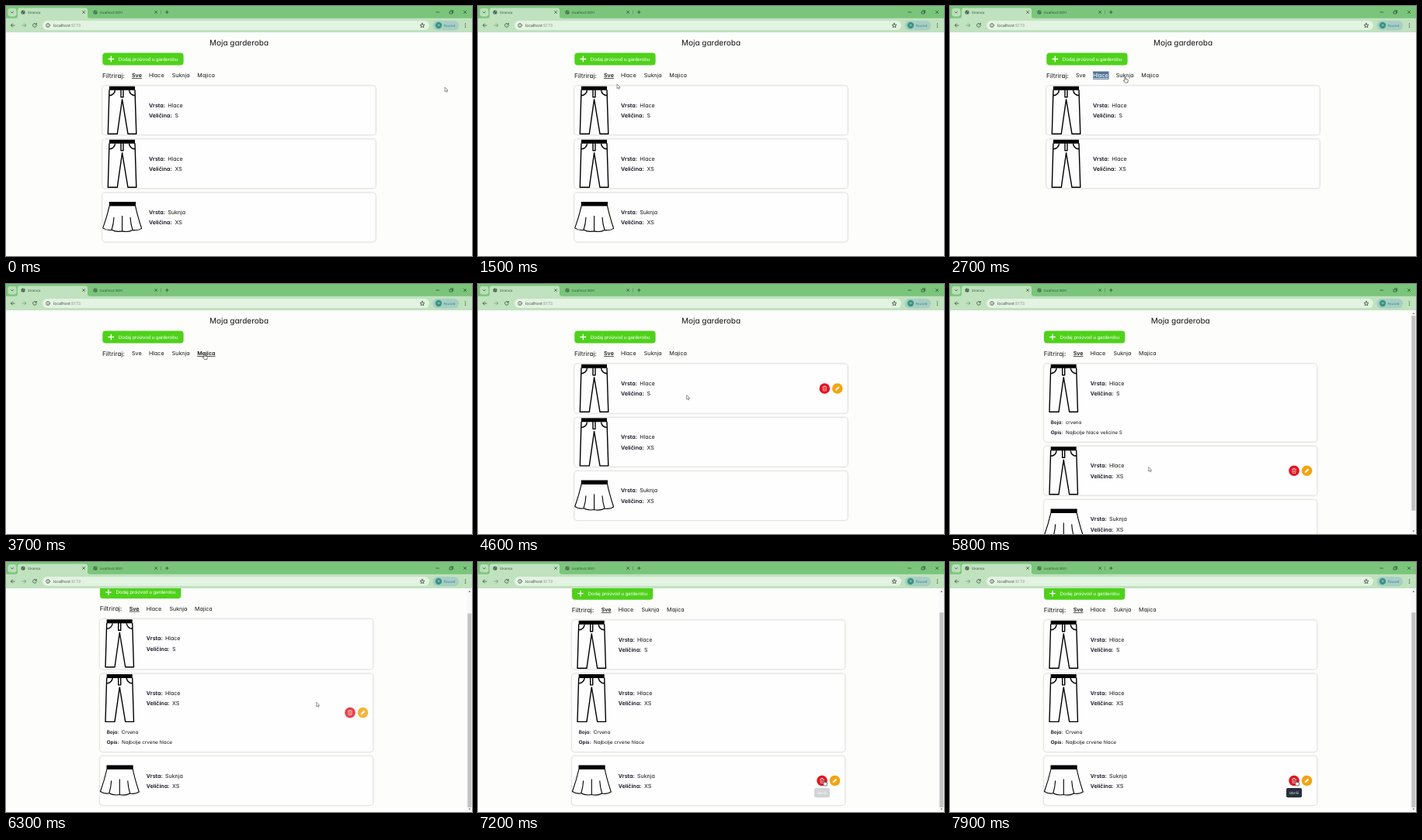
Write an HTML page that moves like this. It is 600x323 px and loops after 8 s.

```html
<!DOCTYPE html>
<html lang="hr">
<head>
<meta charset="utf-8">
<title>Moja garderoba</title>
<style>
  html, body { margin: 0; width: 100%; height: 100%; overflow: hidden; background: #fdfefc; }
  svg { display: block; width: 600px; height: 323px; }
  text { text-rendering: geometricPrecision; white-space: pre; }
  .page text { font-family: Inter, sans-serif; font-size: 7.1px; font-feature-settings: "cv11"; fill: #111; }
  .page .title { font-size: 10px; text-anchor: middle; }
  .page .label { font-size: 8.1px; }
  .page .small text { font-size: 6.3px; }
  .page .add { font: 6.2px "Liberation Sans", Arial, sans-serif; fill: #fff; }
  .page .tip { font: 4.6px "Open Sans", sans-serif; fill: #fff; text-anchor: middle; }
  .page .b { font-weight: 600; fill: #0c0c1c; }
  .page .on { font-weight: 600; text-decoration: underline; text-decoration-thickness: .8px; }
  .page .sel { fill: #fff; font-weight: 500; }
  .chrome text { font: 4.4px "Open Sans", sans-serif; fill: #2b4a2e; }
  .chrome .url { font-size: 5.2px; }
  .line { fill: none; stroke: #2b4a2e; stroke-width: .75; stroke-linecap: round; stroke-linejoin: round; }
  .ink { fill: none; stroke: #000; stroke-width: 1.4; stroke-linejoin: round; }
  .panel { fill: #fefefe; filter: drop-shadow(0 .9px .8px rgba(0,0,0,.3)); }
</style>
</head>
<body>
<svg viewBox="0 0 600 323">
  <defs>
    <clipPath id="view"><rect y="34" width="600" height="289"/></clipPath>
    <g id="pants">
      <path d="M9 .5H42V5.5H9Z"/>
      <path class="ink" d="M9 5L7.3 62H19.3L25.6 17.5L33 62H43.8L42 5M24 5V14.5H27V5M9 12.5Q15.5 12 16.5 5.5M42 12.5Q35.5 12 34.5 5.5"/>
    </g>
    <g id="skirt" transform="translate(0 -.5)">
      <path d="M8.8 12H43V17.5H8.8Z"/>
      <path class="ink" style="stroke-width:1.1" d="M9.3 17C7 27 4 37 .8 46Q6 49.5 12 48.3Q18 51.5 25.5 50Q33 51.8 39 48.5Q46 49.8 50.6 46.5C47.5 37 44.5 27 42.5 17M15 32Q14.5 41 12 48.3M25.6 30V50M36 32Q36.5 41 39 48.5"/>
    </g>
    <g id="globe">
      <circle r="2.6" fill="#3f6045"/>
      <path d="M-1.8 -.6Q-.6 .2 -.4 1.7M.2 -1.8Q.2 -.4 1.8 .1" stroke="#b5dfb4" stroke-width=".7" fill="none"/>
    </g>
  </defs>

  <rect width="600" height="323" fill="#fdfefc"/>
  <g class="page" clip-path="url(#view)">
    <g id="doc">
      <text class="title" x="300" y="51.3">Moja garderoba</text>
      <rect x="124.3" y="60.4" width="104.3" height="16.2" rx="4" fill="#4fd11b"/>
      <path d="M132 68.5H138.6M135.3 65.2V71.8" stroke="#fff" stroke-width="1.3" stroke-linecap="round"/>
      <text class="add" x="144.8" y="70.7">Dodaj proizvod u garderobu</text>
      <text class="label" x="124" y="92.8">Filtriraj:</text>
      <rect id="mark" x="184" y="84.5" width="20.5" height="10.3" fill="#4f7399"/>
      <g id="filters"></g>
      <g id="cards"></g>
    </g>
    <g id="bar">
      <rect x="593.5" y="34" width="6.5" height="289" fill="#f7f8f7"/>
      <path d="M595.3 39L596.8 37L598.3 39ZM595.3 318.6L596.8 320.6L598.3 318.6Z" fill="#777"/>
      <rect id="thumb" x="594.3" width="5" fill="#c1c2c1"/>
    </g>
  </g>

  <g class="chrome">
    <rect width="600" height="17" fill="#7ac57b"/>
    <rect y="15.8" width="600" height="18.2" fill="#c0e2bf"/>
    <rect x="2.5" y="3" width="11" height="10.5" rx="3" fill="#b9dfb8"/>
    <path class="line" d="M6.5 7.5L8 9L9.5 7.5"/>
    <path d="M12 16Q15 16 15 13V5.5Q15 2.5 18 2.5H102Q105 2.5 105 5.5V13Q105 16 108 16Z" fill="#c0e2bf"/>
    <use href="#globe" x="22" y="8"/>
    <use href="#globe" x="115" y="8"/>
    <text x="28" y="9.5">Stranica</text>
    <text x="121" y="9.5">localhost:3001</text>
    <path class="line" d="M98.6 6.5L101.6 9.5M101.6 6.5L98.6 9.5M191.6 6.5L194.6 9.5M194.6 6.5L191.6 9.5M205.3 8H209.3M207.3 6V10"/>
    <path class="line" opacity=".4" d="M199.5 5.8V10.2"/>
    <path class="line" d="M553.8 8H557.6M571.5 7H574.5V10H571.5ZM572.7 5.8H575.7V8.8M589.3 6.3L592.7 9.7M592.7 6.3L589.3 9.7"/>
    <path class="line" d="M11 25H6.5M8.5 22.8L6.3 25L8.5 27.2M39 23.5A2.4 2.4 0 1 0 39.3 25.6M39.3 22.4V24H37.6"/>
    <path class="line" opacity=".5" d="M21 25H25.5M23.5 22.8L25.7 25L23.5 27.2"/>
    <rect x="47" y="19" width="498" height="12" rx="6" fill="#e3f3e1"/>
    <circle cx="54" cy="25" r="4" fill="#f4fbf3"/>
    <circle class="line" cx="54" cy="25" r="2.5"/>
    <path class="line" d="M54 24.9V26.2M54 23.7V23.8"/>
    <text class="url" x="61" y="26.7">localhost<tspan fill="#6d8a70">:5173</tspan></text>
    <path class="line" d="M536 22.2L536.8 24.2L539 24.3L537.3 25.7L537.9 27.8L536 26.6L534.1 27.8L534.7 25.7L533 24.3L535.2 24.2Z"/>
    <rect x="549.5" y="19" width="33.5" height="12.5" rx="6.2" fill="#a6cfc3"/>
    <circle cx="557" cy="25" r="4.2" fill="#3a9583"/>
    <text x="557" y="26.3" text-anchor="middle" style="fill:#fff;font-size:3.6px">H</text>
    <text x="563.4" y="26.6" style="fill:#47739a">Paused</text>
    <path d="M591.5 22.8V22.9M591.5 25V25.1M591.5 27.2V27.3" class="line" style="stroke-width:1.2"/>
  </g>

  <g id="cursor">
    <path id="arrow" d="M0 0V5.6L1.4 4.4L2.3 6.3L3.2 5.9L2.4 4.1H4.1Z" fill="#fff" stroke="#444" stroke-width=".55"/>
    <path id="hand" d="M-.1 .3Q.6 -.6 1.1 .3V3L3.7 3.4Q4.4 3.6 4.3 4.5L3.8 7.6H.6L-1.7 4.7Q-1.3 3.8 -.1 4.8Z" fill="#fff" stroke="#222" stroke-width=".6"/>
  </g>
</svg>
<script>
const LOOP = 8000, STEP = 100;
const TOP = 103.2, HEIGHT = 63, GAP = 6.1, EXTRA = 37.5, FOOT = 9, VIEW = 323;
const $ = id => document.getElementById(id);

const filters = [['Sve', 162], ['Hlace', 184], ['Suknja', 213.7], ['Majica', 246.3]];
const items = [
  { kind: 'Hlace', icon: 'pants', size: 'S', color: 'crvena', note: 'Najbolje hlace velicine S', hover: [4300, 5300] },
  { kind: 'Hlace', icon: 'pants', size: 'XS', color: 'Crvena', note: 'Najbolje crvene hlace', hover: [5350, 6260] },
  { kind: 'Suknja', icon: 'skirt', size: 'XS', color: '', note: '', hover: [6550, 9000] }
];
// [time, active filter]
const clicks = [[0, 'Sve'], [2300, 'Hlace'], [3000, 'Suknja'], [3500, 'Majica'], [4200, 'Sve']];
// [time, x, y] of the pointer tip
const path = [
  [0, 565, 105], [100, 565, 105], [500, 430, 122], [900, 278, 118], [1500, 179, 101],
  [1800, 167, 89], [2100, 194, 90], [2400, 195, 90], [2700, 225, 91.5], [3050, 226, 91],
  [3400, 257, 90], [3650, 258, 90], [4100, 168, 89], [4250, 168, 89], [4600, 268.6, 143.5],
  [5000, 268.6, 144], [5500, 258, 215], [5800, 255.6, 236.5], [6000, 256, 236.5],
  [6300, 399.6, 181.2], [6700, 428, 262], [7000, 445.3, 281.5], [LOOP, 445.3, 281.5]
];

const ramp = (t, a, b) => Math.min(1, Math.max(0, (t - a) / (b - a)));
const smooth = p => p * p * (3 - 2 * p);
const move = (el, x, y) => el.setAttribute('transform', `translate(${x} ${y})`);
const show = (el, on) => { el.style.display = on ? '' : 'none'; };
const pair = (key, val, x, vx, y) =>
  `<text class="b" x="${x}" y="${y}">${key}:</text><text x="${vx}" y="${y}">${val}</text>`;

$('filters').innerHTML = filters.map(([name, x]) => `<text x="${x}" y="92.2">${name}</text>`).join('');
$('cards').innerHTML = items.map((c, i) => `
  <g>
    <clipPath id="clip${i}"><rect width="352" height="63"/></clipPath>
    <rect class="panel" x=".3" width="351.4" rx="3.8"/>
    <use href="#${c.icon}"/>
    ${pair('Vrsta', c.kind, 60, 84.2, 27.5)}
    ${pair('Veličina', c.size, 60, 93.4, 41)}
    <g class="small" clip-path="url(#clip${i})">
      ${c.note && pair('Boja', c.color, 9, 28, 78) + pair('Opis', c.note, 9, 28.3, 90.5)}
    </g>
    <g class="tools">
      <circle cx="322.3" r="6.8" fill="#e5121d"/>
      <path d="M319.5 -2H325.1M321.3 -2V-3.1H323.3V-2M320 -1.8L320.4 3H324.2L324.6 -1.8M321.6 -.4V1.6M323 -.4V1.6" fill="none" stroke="#fff" stroke-width=".6"/>
      <circle cx="338.8" r="6.8" fill="#f3a40f"/>
      <path d="M336 2.8L336.5 .8L340.1 -2.8L341.6 -1.3L338 2.3Z" fill="#fff"/>
    </g>
    <g class="tip-box" opacity="0">
      <rect x="312.3" y="41" width="20" height="12.2" rx="2" fill="#27303c"/>
      <text class="tip" x="322.3" y="48.8">Izbriši</text>
    </g>
  </g>`).join('');

const labels = [...$('filters').children];
const cards = [...$('cards').children].map(el => ({
  el,
  clip: el.querySelector('clipPath rect'),
  panel: el.querySelector('.panel'),
  tools: el.querySelector('.tools'),
  tip: el.querySelector('.tip-box')
}));

function pointer(t) {
  const i = path.findIndex(k => k[0] > t);
  const [a, ax, ay] = path[i - 1], [b, bx, by] = path[i];
  const p = smooth(ramp(t, a, b));
  return [ax + (bx - ax) * p, ay + (by - ay) * p];
}

function draw(t) {
  const active = clicks.filter(c => c[0] <= t).pop()[1];
  const marked = active === 'Hlace';
  labels.forEach((el, i) => {
    const on = filters[i][0] === active;
    el.setAttribute('class', on ? (marked ? 'on sel' : 'on') : '');
  });
  show($('mark'), marked);

  const open = [
    EXTRA * (smooth(ramp(t, 4570, 4980)) - smooth(ramp(t, 5870, 6360))),
    EXTRA * smooth(ramp(t, 5870, 6270)),
    0
  ];
  let y = TOP;
  items.forEach((item, i) => {
    const c = cards[i], on = active === 'Sve' || active === item.kind;
    show(c.el, on);
    if (!on) return;
    const h = HEIGHT + open[i];
    move(c.el, 124, y);
    c.panel.setAttribute('height', h);
    c.clip.setAttribute('height', h);
    move(c.tools, 0, h / 2);
    const [from, to] = item.hover;
    c.tools.setAttribute('opacity', ramp(t, from, from + 200) * (1 - ramp(t, to, to + 200)));
    c.tip.setAttribute('opacity', i === 2 ? ramp(t, 7150, 7400) : 0);
    y += h + GAP;
  });

  const height = y - GAP + FOOT, spare = Math.max(0, height - VIEW);
  const scroll = spare * smooth(ramp(t, 5980, 6250));
  move($('doc'), spare ? -3.3 : 0, -scroll);
  show($('bar'), spare > 0);
  const size = 276 * 289 / (289 + spare);
  $('thumb').setAttribute('height', size);
  $('thumb').setAttribute('y', 41 + (spare ? scroll / spare * (276 - size) : 0));

  const [px, py] = pointer(t);
  const link = t >= 6900 || (px > 160 && px < 272 && py > 82 && py < 97);
  move($('cursor'), px, py);
  show($('hand'), link);
  show($('arrow'), !link);
}

function tick() {
  draw(Math.floor(performance.now() % LOOP / STEP) * STEP);
  requestAnimationFrame(tick);
}
tick();
</script>
</body>
</html>
```
